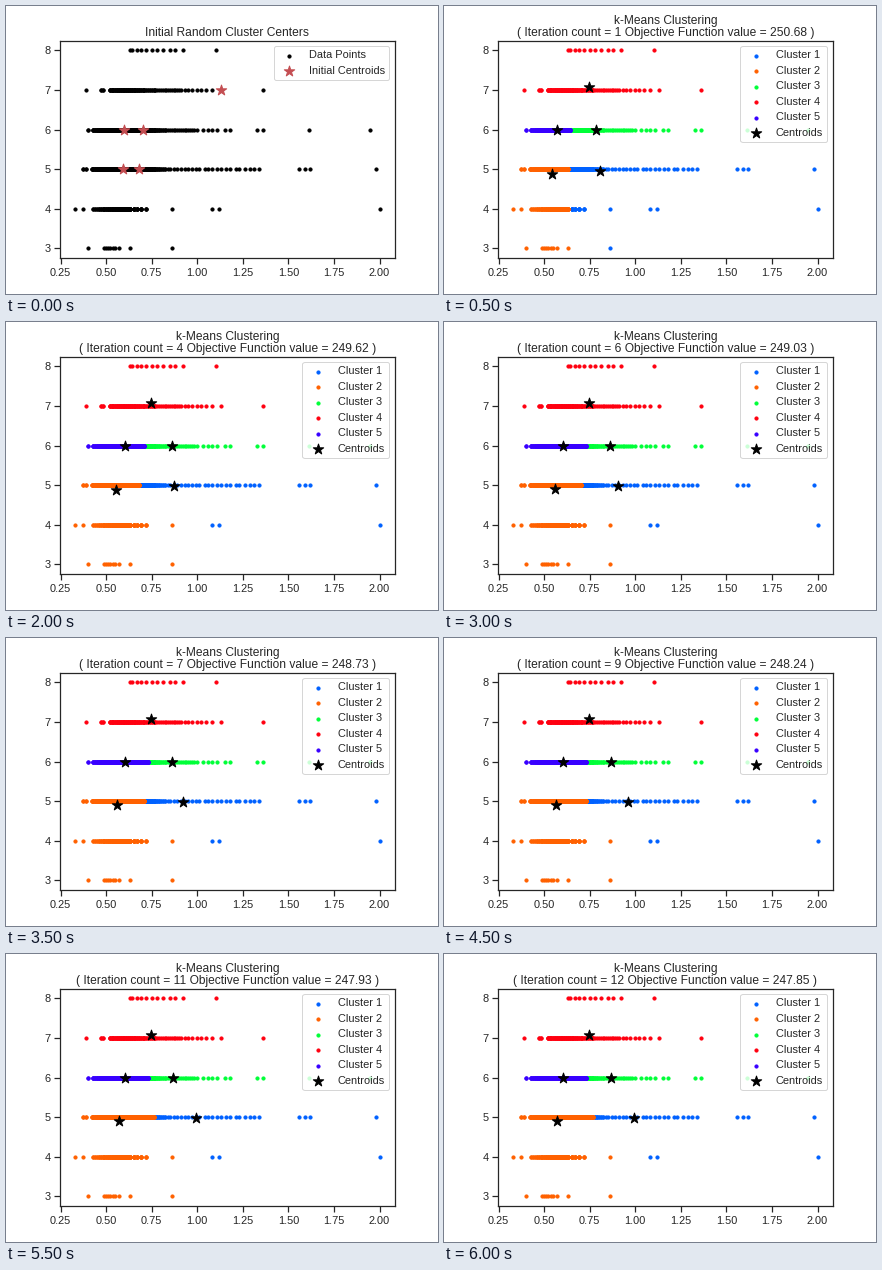
Recreate the animation shown at these times as a matplotlib script. Size 432 px wide and 288 px high, loop 6.5 s.

```python
import numpy as np
import matplotlib.pyplot as plt
from matplotlib.animation import FuncAnimation

INK = "0.15"
plt.rcParams.update({
    "figure.dpi": 72, "savefig.dpi": 72,
    "font.family": "Liberation Sans", "font.size": 12,
    "axes.titlesize": 12, "legend.fontsize": 11,
    "xtick.labelsize": 11, "ytick.labelsize": 11,
    "text.color": INK, "axes.edgecolor": INK,
    "xtick.color": INK, "ytick.color": INK,
    "axes.linewidth": 1.25, "lines.linewidth": 1.5,
    "xtick.major.width": 1.25, "ytick.major.width": 1.25,
    "xtick.major.size": 6, "ytick.major.size": 6,
})

STEPS = 13
COLORS = ["#0061ff", "#ff6100", "#00ff38", "#ff0010", "#3800ff"]

# row: dense start, dense end, tail end, tail size, strays (in hundredths)
ROWS = {
    3: (49, 49, 57, 6, [40, 63, 86]),
    4: (43, 62, 72, 5, [33, 37, 86, 108, 112, 200]),
    5: (42, 79, 134, 26, [37, 39, 156, 159, 162, 198]),
    6: (43, 97, 118, 8, [40, 133, 136, 161, 195]),
    7: (52, 90, 108, 8, [39, 47, 48, 113, 136]),
    8: (63, 63, 92, 10, [110]),
}


def make_points():
    points = []
    for row, (start, end, last, size, strays) in ROWS.items():
        dense = np.arange(start, end + 1)
        # The tail thins out to the right
        t = np.arange(1, size + 1) / size
        tail = np.round(end + (last - end) * t ** 1.3)
        crowd = 24 * np.exp(-((row - 5.4) / 1.2) ** 2)
        for v in np.concatenate([dense, tail, strays]):
            count = 1 + round(crowd * np.exp(-((v - 60) / 12) ** 2))
            points += [(v / 100, row)] * count
    return np.array(points)


POINTS = make_points()

# Each centroid jumps from its start, then drifts through a few key points
START = np.array([(.68, 5), (.59, 5), (.70, 6), (1.13, 7), (.60, 6)])
KEYS = [1, 2, 4, 11]
DRIFT = [
    ([.806, .839, .872, .993], 4.96, 4.98),
    ([.543, .549, .555, .571], 4.87, 4.91),
    ([.784, .817, .861, .867], 6, 6),
    ([.746] * 4, 7.08, 7.08),
    ([.570, .588, .603, .603], 6, 6),
]


def centroids(step):
    if step == 0:
        return START
    return np.array([(np.interp(step, KEYS, xs),
                      np.interp(step, [1, 11], [y0, y1]))
                     for xs, y0, y1 in DRIFT])


def objective(step):
    return np.interp(step, [1, 2, 4, 7, 10, 12],
                     [250.68, 250.20, 249.62, 248.73, 248.00, 247.85])


def nearest(centers):
    gaps = POINTS[:, None, :] - centers[None, :, :]
    return (gaps ** 2).sum(axis=2).argmin(axis=1)


def dots(points, color, label):
    ax.scatter(*points.T, s=10, color=color, label=label)


def stars(step, color, label):
    ax.scatter(*centroids(step).T, s=120, marker="*", color=color, label=label)


fig, ax = plt.subplots(figsize=(6, 4))
fig.subplots_adjust(left=.125, right=.9, bottom=.125, top=.88)


def draw(step):
    ax.clear()
    if step == 0:
        dots(POINTS, "black", "Data Points")
        stars(0, "#c44e52", "Initial Centroids")
        title = "Initial Random Cluster Centers"
    else:
        labels = nearest(centroids(step - 1))
        for k, color in enumerate(COLORS):
            dots(POINTS[labels == k], color, f"Cluster {k + 1}")
        stars(step, "black", "Centroids")
        title = (f"k-Means Clustering\n( Iteration count = {step} "
                 f"Objective Function value = {objective(step):.2f} )")
    ax.set_title(title, pad=5, linespacing=1)
    ax.set_xlim(.2465, 2.0835)
    ax.set_ylim(2.75, 8.25)
    ax.set_xticks(np.arange(.25, 2.01, .25))
    ax.set_yticks(range(3, 9))
    ax.xaxis.set_major_formatter("{x:.2f}")
    ax.legend(loc="upper right", scatterpoints=1)
    return []


anim = FuncAnimation(fig, draw, frames=STEPS, interval=500,
                     repeat=True, repeat_delay=0)
plt.show()
```
